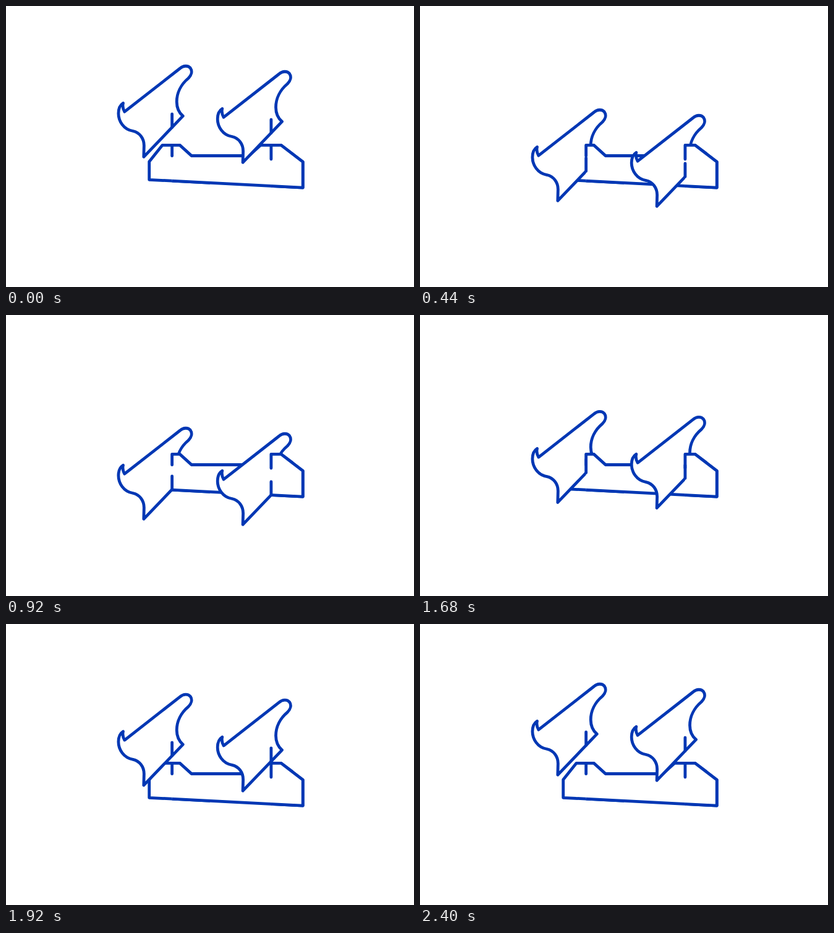
An HTML page for the animation above (3 s loop, 660 px wide and 455 px high).

```html
<!DOCTYPE html>
<html lang="en">
<head>
<meta charset="utf-8">
<title>Interlocking slots</title>
<style>
  html, body { margin: 0; width: 100%; height: 100%; overflow: hidden; background: #fff; }
  svg { display: block; width: 660px; height: 455px; }
</style>
</head>
<body>
<svg viewBox="0 0 660 455" fill="#fff" stroke="#0037b4" stroke-width="4.8" stroke-linecap="round" stroke-linejoin="round">
  <defs>
    <path id="base" d="M231.7 281.3V252L253 225.3H281L300 242.5H393L412 225.3H445L480.2 252.3V294.2Z"/>
    <path id="fin" d="M191.8 171.2L281.5 101C287 96.3 294.5 95.8 298.3 100.6C301.8 105.5 300 112 295 117C283 127 276.2 141 276.2 155C276.2 165 280 173 286.2 178.2L222.8 244.3L223.3 226C223.3 214 216 205 205.5 202.5C190 200 181.9 186 181.9 174C181.9 166.500 185 160 189.500 157.200C188.300 162 189.300 167 191.800 171.200Z"/>
    <path id="slit" d="M268.6 175V196.500"/>
    <clipPath id="front"><path d="M268.6 200H330V320H268.6ZM428.9 200H500V320H428.9Z"/></clipPath>
  </defs>
  <use href="#base"/>
  <g class="drop">
    <use href="#fin"/>
    <use href="#fin" x="160.300" y="9"/>
  </g>
  <!-- right of each slot the base lies over the fin -->
  <g clip-path="url(#front)"><use href="#base"/></g>
  <path d="M268.6 225.3V242.700M428.9 225.3V248"/>
  <g class="drop">
    <use href="#slit"/>
    <use href="#slit" x="160.300" y="9"/>
  </g>
</svg>
<script>
const LOOP = 3000, STEP = 40, DEPTH = 86, MOVE = 720;
const parts = document.querySelectorAll('.drop');

// Bezier ease (0, 0, 0.1, 1), solved by bisection
function ease(x) {
  if (x <= 0) return 0;
  if (x >= 1) return 1;
  let lo = 0, hi = 1;
  for (let i = 0; i < 30; i++) {
    const u = (lo + hi) / 2;
    if (u * u * (u + 0.3 * (1 - u)) < x) lo = u; else hi = u;
  }
  return lo * lo * (3 - 2 * lo);
}

function draw(now) {
  const t = Math.floor(now % LOOP / STEP) * STEP;
  const y = DEPTH * (ease((t - 124) / MOVE) - ease((t - 1624) / MOVE));
  for (const part of parts) part.setAttribute('transform', `translate(0 ${y.toFixed(2)})`);
}

const start = performance.now();
function tick() {
  draw(performance.now() - start);
  requestAnimationFrame(tick);
}
tick();
</script>
</body>
</html>
```
